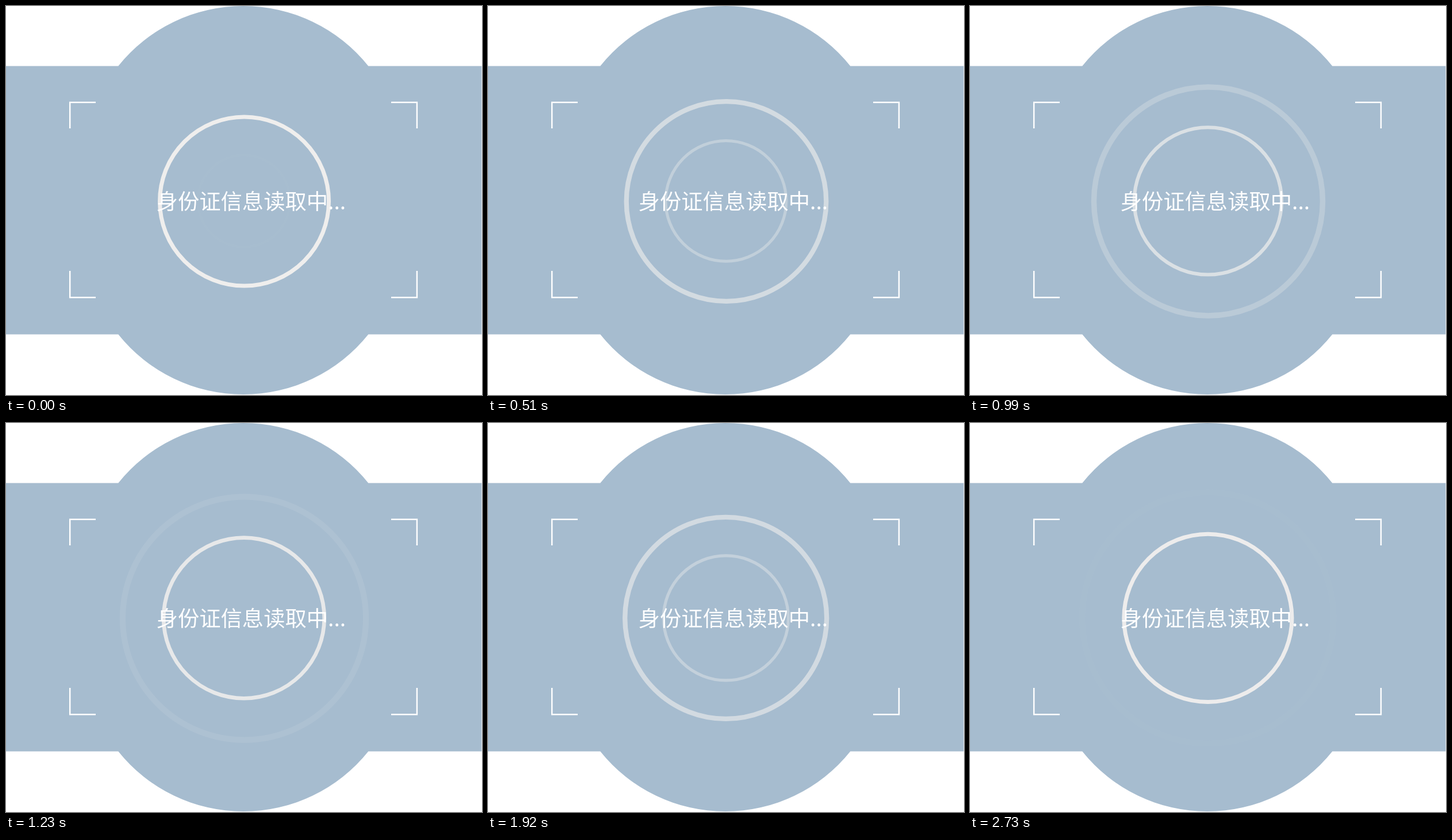
Animation of 828 by 677 pixels, one loop 2760 ms. Source, as an HTML page:

```html
<!DOCTYPE html>
<html lang="zh">
<head>
<meta charset="utf-8">
<style>
  html, body { margin: 0; width: 100%; height: 100%; overflow: hidden; background: #fff; }
  svg { display: block; width: 828px; height: 677px; }
  .panel { fill: #a6bccf; }
  .corners { fill: none; stroke: #fff; stroke-width: 2.5; }
  .ring { fill: none; stroke: #efeeed; opacity: 0; }
  text { fill: #fff; font: 500 37.3px "Noto Sans CJK SC", "Noto Sans CJK", sans-serif; }
</style>
</head>
<body>
<svg viewBox="0 0 828 677">
  <path class="panel" d="M0 104.5H195.3A278.6 278.6 0 0 1 630.3 104.5H827.3V571.5H630.3A278.6 278.6 0 0 1 195.3 571.5H0Z"/>
  <path class="corners" d="M111.2 213V167.8H156M670 167.8H714.9V213M111.2 461V507.3H156M670 507.3H714.9V461"/>
  <circle class="ring" id="outer"/>
  <circle class="ring" id="inner"/>
  <text x="261.7" y="354">身份证信息读取中...</text>
</svg>
<script>
  const PULSE = 1380, FRAME = 30, WEIGHT = 0.0465;

  // Each pulse: outer-edge radius from/to, then the centre.
  const pulses = {
    inner: [[82, 150.6, 413.9, 339.4], [85.5, 151, 413.9, 339.4]],
    outer: [[150.5, 224.7, 414.5, 340], [150.2, 225.5, 413.7, 339.4]]
  };

  const pose = (radius, cx, cy, opacity, offset) => ({
    r: radius * (1 - WEIGHT / 2) + 'px',
    strokeWidth: radius * WEIGHT + 'px',
    cx: cx + 'px',
    cy: cy + 'px',
    opacity,
    offset,
    easing: `steps(${PULSE / FRAME}, end)`
  });

  function animateRing(id, startOpacity, endOpacity) {
    const list = pulses[id];
    const keyframes = list.flatMap(([from, to, cx, cy], i) => [
      pose(from, cx, cy, startOpacity, i / list.length),
      pose(to, cx, cy, endOpacity, (i + 1) / list.length)
    ]);
    document.getElementById(id).animate(keyframes, {
      duration: PULSE * list.length,
      iterations: Infinity
    });
  }

  animateRing('inner', 0.02, 1);
  animateRing('outer', 1, 0);
</script>
</body>
</html>
```
